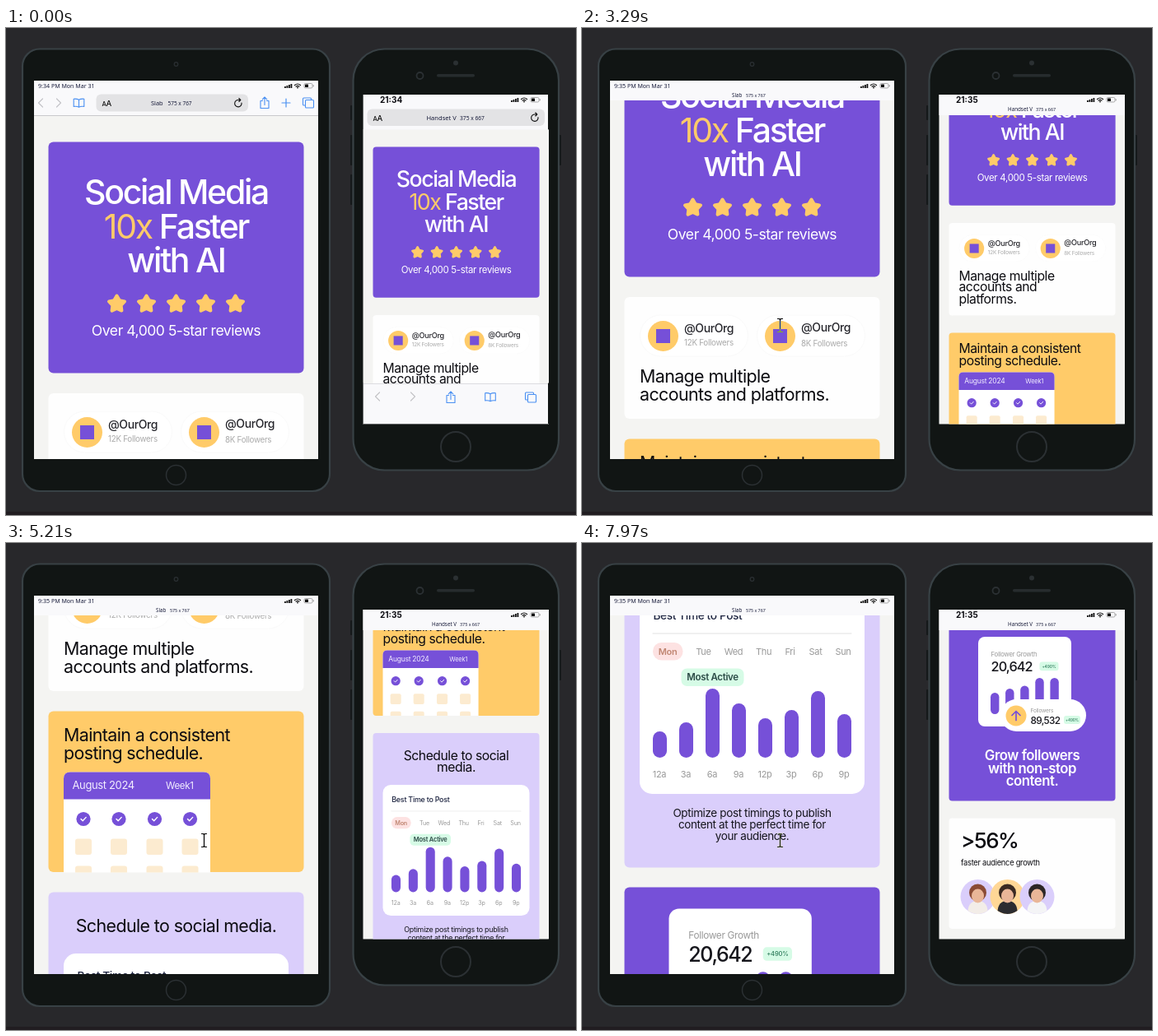
Write an HTML page that moves like this. It is 692 px wide and 592 px high and loops after 8000 ms.

```html
<!DOCTYPE html>
<html lang="en">
<head>
<meta charset="utf-8">
<title>Responsive page preview</title>
<style>
  html, body { margin: 0; width: 100%; height: 100%; overflow: hidden; background: #28282b; }
  svg { display: block; font-family: Inter, "Open Sans", sans-serif; }
  text { letter-spacing: -.028em; white-space: pre; }
  .mid { text-anchor: middle; }
  .tight { letter-spacing: -.055em; }
  .ui { font-family: "Open Sans", "Noto Sans", sans-serif; letter-spacing: 0; fill: #0c1030; }
  .line { fill: none; stroke-linecap: round; stroke-linejoin: round; }
  #beam { mix-blend-mode: difference; }
</style>
</head>
<body>
<svg id="stage" width="692" height="592" viewBox="0 0 692 592"></svg>
<script>
const PURPLE = '#7650d8', YELLOW = '#ffcb69', LILAC = '#dacefb', BLUE = '#4a90f2', BAR = '#f9f9fb', GREY = '#999';
const INK = '#0b0b10', BEZEL = '#111514';
const PHONE = 0.652; // phone card width relative to tablet card width

const attrs = o => Object.entries(o).map(([k, v]) => `${k}="${v}"`).join(' ');
const rect = (x, y, width, height, rx, fill, more = {}) => `<rect ${attrs({ x, y, width, height, rx, fill, ...more })}/>`;
const circle = (cx, cy, r, fill, more = {}) => `<circle ${attrs({ cx, cy, r, fill, ...more })}/>`;
const line = (d, stroke, width = 1) => `<path class="line" ${attrs({ d, stroke, 'stroke-width': width })}/>`;
const text = (x, y, s, size, fill = INK, weight = 400, cls = '', more = {}) =>
  `<text ${attrs({ x, y, 'font-size': size, fill, 'font-weight': weight, class: cls, ...more })}>${s}</text>`;
const at = (x, y, body, scale = 1) => `<g transform="translate(${x} ${y}) scale(${scale})">${body}</g>`;
const lines = (x, ys, words, ...style) => ys.map((y, i) => text(x, y, words[i], ...style)).join('');
const each = (list, draw) => list.map(draw).join('');

// ---- page parts, in tablet units ----
function star(x, y) {
  const points = Array.from({ length: 10 }, (_, i) => {
    const a = Math.PI * (i / 5 - .5), r = i % 2 ? 5.4 : 10;
    return `${(x + r * Math.cos(a)).toFixed(1)},${(y + r * Math.sin(a)).toFixed(1)}`;
  });
  return `<polygon points="${points.join(' ')}" fill="${YELLOW}" stroke="${YELLOW}" stroke-width="4" stroke-linejoin="round"/>`;
}

const hero = rect(0, 0, 310, 281, 6, PURPLE) +
  lines(155, [75, 117, 158.5], ['Social Media', `<tspan fill="${YELLOW}" font-weight="400">10x</tspan> Faster`, 'with AI'],
    41, '#fff', 500, 'mid tight') +
  each([0, 1, 2, 3, 4], i => star(83 + i * 36, 197)) +
  text(155, 235.5, 'Over 4,000 5-star reviews', 17.6, '#fff', 400, 'mid');

const account = (x, dy, count) =>
  rect(x - 28, 22, 131, 50, 25, '#fff', { stroke: '#fafafa' }) +
  circle(x, 47.5, 18.5, YELLOW) + rect(x - 8.5, 39, 17, 17, 0, PURPLE) +
  text(x + 25.5, 43 - dy, '@OurOrg', 14, '#26262c', 500) +
  text(x + 25.5, 59 + dy, count + ' Followers', 9.8, '#aaa');
const accounts = account(47, 0, '12K') + account(189, 1, '8K');

const columns = [24, 67, 110.5, 153.5];
const calendar = `<path d="M0 122V8Q0 0 8 0H170Q178 0 178 8V122Z" fill="#fff"/>` +
  `<path d="M0 33V8Q0 0 8 0H170Q178 0 178 8V33Z" fill="${PURPLE}"/>` +
  text(10.5, 20.5, 'August 2024', 13, '#f3eeff') + text(124, 20, 'Week1', 11.5, '#f3eeff') +
  each(columns, x => circle(x, 57, 8.6, PURPLE) + line(`M${x - 3} 57l2.2 2.3 4-4.4`, '#fff', 1.4) +
    rect(x - 10, 81, 20, 19.5, 3, '#fcebd0') + `<path d="M${x - 10} 122v-5q0-3 3-3h14q3 0 3 3v5z" fill="#fcebd0"/>`);

const days = [['Tue', 77.5], ['Wed', 114], ['Thu', 150.5], ['Fri', 182.5], ['Sat', 213.5], ['Sun', 247]];
const hours = [['12a', 32], ['3a', 43], ['6a', 84], ['9a', 66], ['12p', 48], ['3p', 58], ['6p', 81], ['9p', 53]];
const chart = rect(0, 0, 273, 244, 15, '#fff') +
  text(16.5, 32, 'Best Time to Post', 13.7, '#1d2440', 500) +
  line('M16 49H257', '#ececec', 1.3) +
  rect(16, 60, 36.5, 21.5, 10.5, '#fde2e2') + text(34, 75, 'Mon', 11, '#c08672', 600, 'mid') +
  each(days, ([d, x]) => text(x, 75, d, 11, GREY, 400, 'mid')) +
  rect(50.5, 91.5, 76, 21.5, 7, '#d6fbe6') + text(88.5, 106.3, 'Most Active', 11.5, '#2b4a46', 600, 'mid') +
  each(hours, ([h, size], i) => rect(16 + i * 32, 200 - size, 17, size, 8.5, PURPLE) +
    text(24 + i * 32, 224, h, 11, GREY, 400, 'mid'));

// Growth panel is in phone units.
const badge = (x, y, w, h) => rect(x, y, w, h, 3, '#d6fbe6') + text(x + w / 2, y + h * .67, '+490%', h * .46, '#2f7d5c', 500, 'mid');
const growth = rect(0, 0, 113, 109, 8, '#fff') +
  text(15.5, 23.5, 'Follower Growth', 7.7, GREY) + text(15.5, 42, '20,642', 16.3, '#16161c', 500, 'tight') +
  badge(74.5, 30.5, 23, 10.8) +
  each([68, 63, 59.5, 50, 50], (y, i) => rect(15 + i * 18.1, y, 10.4, 94 - y, 5.2, PURPLE)) +
  rect(27, 76, 104, 39, 19.5, '#fff') + circle(46, 96, 12.5, YELLOW) +
  line('M46 101.5V90.5M41 95.5L46 90.5L51 95.5', PURPLE, 1.7) +
  text(63.5, 91.5, 'Followers', 6.5, GREY) + text(63.5, 106, '89,532', 11.8, '#16161c', 500, 'tight') +
  badge(104, 96, 20, 10);

const person = (x, fill, hair, shirt) => circle(x, 0, 21, fill) +
  `<path d="M${x - 12} 17Q${x - 11} 5 ${x} 5T${x + 12} 17Q${x} 25 ${x - 12} 17Z" fill="${shirt}"/>` +
  circle(x, -5, 10.5, hair) + `<ellipse cx="${x}" cy="-1" rx="7.5" ry="8.5" fill="#e9b698"/>`;

// ---- pages ----
const optimize = ['Optimize post timings to publish', 'content at the perfect time for', 'your audience.'];
const grow = ['Grow followers', 'with non-stop', 'content.'];

const tabletPage =
  at(51.5, 138.5, hero) +
  at(51.5, 444, rect(0, 0, 310, 148, 6, '#fefefe') + accounts +
    lines(18.5, [104, 126], ['Manage multiple', 'accounts and platforms.'], 21.4)) +
  at(51.5, 616.5, rect(0, 0, 310, 195.5, 6, YELLOW) +
    lines(18.5, [36.5, 58.5], ['Maintain a consistent', 'posting schedule.'], 21.4) + at(18.5, 74, calendar)) +
  at(51.5, 836.5, rect(0, 0, 310, 408, 6, LILAC) +
    text(155, 48.5, 'Schedule to social media.', 21.4, INK, 400, 'mid') + at(18.5, 74.5, chart) +
    lines(155, [346.5, 360.5, 374.5], optimize, 13.5, '#15151c', 400, 'mid')) +
  at(51.5, 1268.5, rect(0, 0, 310, 331, 6, PURPLE) + at(54, 26, growth, 1 / PHONE));

const phonePage =
  at(445.5, 144.5, hero, PHONE) +
  at(445.5, 349, rect(0, 0, 202, 112.5, 4, '#fefefe') + at(0, 0, accounts, PHONE) +
    lines(12, [70, 83, 98], ['Manage multiple', 'accounts and', 'platforms.'], 15.7)) +
  at(445.5, 482.5, rect(0, 0, 202, 127.5, 4, YELLOW) +
    lines(12, [24, 39], ['Maintain a consistent', 'posting schedule.'], 15.7) + at(12, 48, calendar, PHONE)) +
  at(445.5, 631, rect(0, 0, 202, 284, 4, LILAC) +
    lines(101, [32.5, 46.5], ['Schedule to social', 'media.'], 15.7, INK, 400, 'mid') + at(12, 63, chart, PHONE) +
    lines(101, [242, 252, 262], optimize, 8.9, '#15151c', 400, 'mid')) +
  at(445.5, 936.5, rect(0, 0, 202, 216, 4, PURPLE) + at(35.5, 16.5, growth) +
    lines(101, [166.5, 182, 197.5], grow, 16.8, '#fff', 600, 'mid')) +
  at(445.5, 1173.5, rect(0, 0, 202, 134.5, 4, '#fefefe') +
    text(14.5, 36.5, '&gt;56%', 26, INK, 500, 'tight') + text(14.5, 57.5, 'faster audience growth', 9.3) +
    at(0, 95.5, person(35, LILAC, '#8a4b35', '#f3ede8') + person(71, '#ffd796', '#3a2a22', '#2c2c30') +
      person(107, LILAC, '#2b2626', '#f4f4f6')));

// ---- browser chrome ----
const back = (x, y) => line(`M${x + 2.5} ${y - 5}L${x - 2.5} ${y}L${x + 2.5} ${y + 5}`, '#c4c4c8', 1.2);
const next = (x, y) => line(`M${x - 2.5} ${y - 5}L${x + 2.5} ${y}L${x - 2.5} ${y + 5}`, '#c4c4c8', 1.2);
const share = (x, y) => at(x, y, line('M-2.5-2.5H-5V6.5H5V-2.5H2.5M0 2.5V-7M-2.8-4.2L0-7L2.8-4.2', BLUE, 1.1));
const book = (x, y) => at(x, y, line('M0-3.8Q-2-5-6.3-4.8V4.4Q-2 4 0 5.3Q2 4 6.3 4.4V-4.8Q2-5 0-3.8V5.3', BLUE, 1.1));
const tabs = (x, y) => at(x, y, line('M-3.5 3H-5.5Q-6.5 3-6.5 2V-5Q-6.5-6-5.5-6H2.5Q3.5-6 3.5-5V-3.5M-2.5-3.5H5.5Q6.5-3.5 6.5-2.5V5Q6.5 6 5.5 6H-2.5Q-3.5 6-3.5 5V-2.5Q-3.5-3.5-2.5-3.5Z', BLUE, 1.1));
const reload = (x, y) => at(x, y, line('M4-.5A4.2 4.2 0 1 1 .5-4L2.5-4M.8-6L2.8-4L.8-2', '#111', 1.1));
const reader = (x, y) => text(x, y, 'A', 7.5, '#111', 500) + text(x + 5, y, 'A', 9.5, '#111', 500);
const signal = (x, y) => at(x, y, each([0, 1, 2, 3], i => rect(i * 2.5, 3.5 - i, 1.8, 2 + i, 0, '#111')) +
  line('M12.5 2Q16 -1 19.5 2M14 3.6Q16 2 18 3.6', '#111', 1.2) + circle(16, 5, .9, '#111') +
  rect(24, 0, 10, 5.5, 1.5, 'none', { stroke: '#888', 'stroke-width': .7 }) + rect(25, 1, 4, 3.5, .5, '#111') + rect(34.7, 1.8, .9, 2, 0, '#888'));
const label = (x, y, name, gap, size, big) => text(x, y, name, big, '', 400, 'ui') + text(x + gap, y, size, big - .9, '', 400, 'ui');

const tabletFull = back(42, 91) + next(64, 91) + book(88.5, 91) + rect(109.5, 80.5, 184.5, 21, 6, '#e3e3e5') +
  reader(116.5, 95) + label(176, 94, 'Slab', 20.5, '575 x 767', 7.4) + reload(282, 91.5) + share(314, 91) +
  line('M335 91H345M340 86V96', BLUE, 1.2) + tabs(367, 91);
const phoneFull = rect(438.5, 98.5, 215.5, 20.5, 6, '#e3e3e5') + reader(445.5, 112.5) +
  label(510.5, 112, 'Handset V', 40.5, '375 x 667', 7.6) + reload(642, 109) +
  line('M433.5 81V123M658.5 81V123', BEZEL);
const phoneTools = rect(433, 432, 227, 50, 0, BAR) + line('M433 432.5H660', '#dcdce0') +
  back(451, 448) + next(494, 448) + share(540, 449) + book(588, 448.5) + tabs(637, 449) +
  line('M433.5 432V481.5H658.5V432', BEZEL);

const device = (x, y, w, h, r) => rect(x, y, w, h, r, BEZEL, { stroke: '#384145', 'stroke-width': 2.2 });
const ring = (x, y, r, w) => circle(x, y, r, 'none', { stroke: '#2b3033', 'stroke-width': w });
const button = (x, y, h) => rect(x, y, 2.5, h, 1, '#15191a');

document.getElementById('stage').innerHTML = `
  <clipPath id="tabletScreen"><rect x="34" y="64" width="345" height="460"/></clipPath>
  <clipPath id="phoneScreen"><rect x="433.5" y="81" width="225.5" height="400.5"/></clipPath>
  ${rect(0, 0, 692, 592, 0, '#28282b') + rect(0, 588, 692, 4, 0, '#211d21')}
  ${device(20, 25.5, 373, 537.5, 21) + ring(206.5, 44, 2.3, 1.2) + ring(206.5, 543.5, 12, 1.5)}
  ${button(418, 94, 18) + button(418, 130, 37) + button(418, 178, 37) + button(671.5, 130, 37)}
  ${device(421.5, 25.5, 249.5, 512, 38) + ring(502.5, 58, 4, 1.8) + circle(546, 42.5, 3, '#2b3032')}
  ${rect(523, 56, 46, 3.5, 1.7, '#272c2e') + ring(546, 509, 18, 2)}
  <g clip-path="url(#tabletScreen)">
    ${rect(34, 63, 345, 461, 0, '#f4f4f2')}
    <g id="tabletPage">${tabletPage}</g>
    ${rect(34, 63, 345, 43, 0, BAR, { id: 'tabletBar' })}
    <path id="tabletRule" d="M34 106.5H379" stroke="#c9c9cc"/>
    <g id="tabletFull">${tabletFull}</g>
    <g id="tabletSlim">${label(182, 84, 'Slab', 17, '575 x 767', 6.2)}</g>
    ${text(39, 73, '', 7.1, '', 400, 'ui', { id: 'tabletClock' }) + signal(338, 67.5)}
  </g>
  <g clip-path="url(#phoneScreen)">
    ${rect(433, 81, 227, 401, 0, '#f4f4f2')}
    <g id="phonePage">${phonePage}</g>
    ${rect(433, 81, 227, 42.5, 0, BAR, { id: 'phoneBar' })}
    <g id="phoneFull">${phoneFull}</g>
    <g id="phoneSlim">${label(517, 101, 'Handset V', 34, '375 x 667', 6.3)}</g>
    <g id="phoneTools">${phoneTools}</g>
    ${text(454, 91.2, '', 10, INK, 700, '', { id: 'phoneClock', style: 'letter-spacing:0' }) + signal(613, 84.5)}
  </g>
  <path id="arrow" d="M0 0V15.5L3.6 12.2L6 18L8.4 17L6 11.3H11Z" fill="#fff" stroke="#000" stroke-width=".9"/>
  <path id="beam" class="line" d="M-3 -8H-1L0 -7L1 -8H3M0 -7V7M-3 8H-1L0 7L1 8H3" stroke="#fff" stroke-width="1.2"/>`;

// ---- motion ----
const LOOP = 8000;
const POINTER = [500, 1130, 10];
const PHONE_LAG = 2; // pixels the phone page trails behind
// start, end, steps, tablet scroll, phone scroll
const SCROLLS = [
  [2170, 2770, 11, 72, 66],
  [3050, 3670, 11, 176, 176],
  [3950, 4440, 9, 300, 285],
  [4790, 5210, 8, 412, 402],
  [5490, 5930, 8, 532, 531],
  [6330, 6710, 7, 637, 624],
  [6990, 7540, 10, 748, 739],
  [7770, 7970, 4, 850, 841]
];
const clamp = v => Math.min(1, Math.max(0, v));
const ease = p => p ** 1.4 / (p ** 1.4 + (1 - p) ** 1.4);
const mix = (a, b, p) => a + (b - a) * p;
const stepped = (t, [from, to, n]) => clamp((Math.floor((t - from) / (to - from) * (n - 1) + .15) + 1) / n);
const scrollAt = (t, column) => SCROLLS.reduce((pos, row) => mix(pos, row[column], ease(stepped(t, row))), 0);

const el = id => document.getElementById(id);
const set = (id, name, value) => el(id).setAttribute(name, value);
const move = (id, x, y) => set(id, 'transform', `translate(${x} ${y})`);

function draw(t) {
  move('tabletPage', 0, -Math.round(scrollAt(t, 3)));
  move('phonePage', 0, -Math.max(0, Math.round(scrollAt(t, 4) - PHONE_LAG)));

  const slim = clamp((t - 2235) / 200);
  set('tabletBar', 'height', mix(43.5, 25, slim));
  set('phoneBar', 'height', mix(42.5, 25, slim));
  move('phoneTools', 0, 50 * slim);
  for (const name of ['tablet', 'phone']) {
    set(name + 'Full', 'opacity', clamp(1 - 2 * slim));
    set(name + 'Slim', 'opacity', clamp(2 * slim - 1));
  }
  set('tabletRule', 'opacity', t < 2160 ? 1 : 0);

  const minute = t < 2490 ? 34 : 35;
  el('tabletClock').textContent = `9:${minute} PM Mon Mar 31`;
  el('phoneClock').textContent = `21:${minute}`;

  const p = stepped(t, POINTER), q = ease(p);
  move('arrow', mix(336, 240.5, q), mix(551, 361.5, q));
  move('beam', 240.5, 361.5);
  set('arrow', 'opacity', p > 0 && p < .9 ? 1 : 0);
  set('beam', 'opacity', p >= .9 ? 1 : 0);
}

const start = performance.now();
function tick() {
  draw((performance.now() - start) % LOOP);
  requestAnimationFrame(tick);
}
tick();
</script>
</body>
</html>
```
